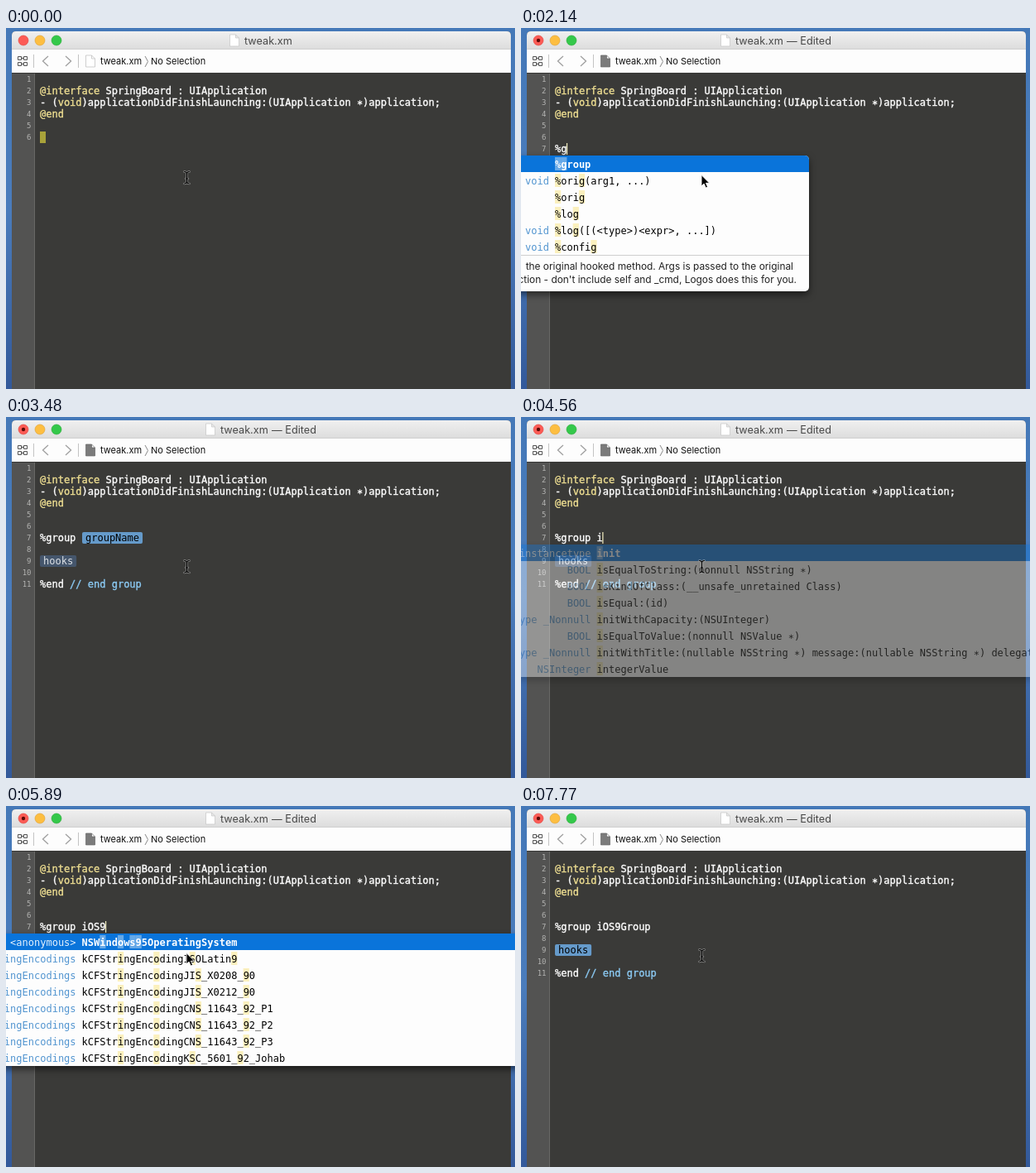
Write an HTML page that moves like this. It is 615x436 px and loops after 8000 ms.

```html
<!DOCTYPE html>
<html>
<head>
<meta charset="utf-8">
<style>
html, body { margin: 0; width: 100%; height: 100%; overflow: hidden; background: #3f6ca9; }
svg { display: block; }
text { white-space: pre; }
.code { font: 12px "DejaVu Sans Mono", monospace; stroke-width: .35px; }
.row { font: 12px "DejaVu Sans Mono", monospace; }
.bold { font-weight: bold; }
.num { font: 9px "DejaVu Sans Mono", monospace; fill: #b4b4b2; text-anchor: end; }
.ui { font-family: Inter, "Open Sans", sans-serif; }
.popup { filter: drop-shadow(0 4px 4px #0008); }
</style>
</head>
<body>
<svg id="stage" width="615" height="436" viewBox="0 0 615 436">
  <defs>
    <linearGradient id="desk" x2="0" y2="1">
      <stop stop-color="#4478b8"/><stop offset=".5" stop-color="#4a7cbc"/><stop offset="1" stop-color="#33599a"/>
    </linearGradient>
    <linearGradient id="bar" x2="0" y2="1"><stop stop-color="#f0f0f0"/><stop offset="1" stop-color="#dcdcdc"/></linearGradient>
  </defs>
  <rect width="615" height="436" fill="url(#desk)"/>
  <path d="M7 436V9q0-5 5-5H605q5 0 5 5V436z" fill="#3a3a38"/>
  <path d="M7 26V9q0-5 5-5H605q5 0 5 5V26z" fill="url(#bar)"/>
  <path d="M7 26H610V54H7z" fill="#fdfdfd"/>
  <path d="M7 25.5H610" stroke="#cfcfcf"/>
  <path d="M7 55H34V436H7z" fill="#535352"/>
  <path d="M34.5 55V436" stroke="#686866"/>
  <g stroke-width=".6">
    <circle cx="21" cy="15" r="6" fill="#fc5b55" stroke="#e0443e"/>
    <circle cx="41" cy="15" r="6" fill="#fdbe41" stroke="#dea033"/>
    <circle cx="61" cy="15" r="6" fill="#34c84a" stroke="#27a935"/>
  </g>
  <g fill="none" stroke="#555">
    <path d="M14.5 34.5h4v4h-4zM21.5 34.5h4v4h-4zM14.5 41.5h4v4h-4zM21.5 41.5h4v4h-4zM18.5 36.5h3M18.5 43.5h3"/>
    <path d="M33.5 32V48M87.5 32V48" stroke="#c4c4c4"/>
    <path d="M51 34l-6.5 6 6.5 6M72 34l6.5 6-6.5 6" stroke="#a0a0a0" stroke-width="1.3"/>
    <path d="M168 34l3.5 6.500-3.500 6.500" stroke="#888"/>
  </g>
  <g class="ui" font-size="11" fill="#111"><text x="114" y="44">tweak.xm</text><text x="175" y="44">No Selection</text></g>
  <g id="scene"></g>
</svg>
<script>
const CH = 7.224, LEFT = 41, TOP = 154, ROW = 20;
const YELLOW = '#efdf92', BLUE = '#8ccbf5';

const esc = s => s.replace(/&/g, '&amp;').replace(/</g, '&lt;').replace(/\*/g, '∗');
const text = (x, y, s, fill, cls, extra = '') =>
  `<text x="${x}" y="${y}" class="${cls}" fill="${fill}" ${extra}>${esc(s)}</text>`;
const rect = (x, y, w, h, fill, r = 0) =>
  `<rect x="${x}" y="${y}" width="${w}" height="${h}" rx="${r}" fill="${fill}"/>`;
const baseline = line => 52 + 14 * line;
const code = (col, line, s, fill = '#fff') =>
  text(LEFT + col * CH, baseline(line), s, fill, 'code', `stroke="${fill}"`);
const page = (x, y, fill, edge) =>
  `<path d="M${x} ${y}h7l4 4v10h-11zM${x + 7} ${y}v4h4" fill="${fill}" stroke="${edge}" stroke-width=".7"/>`;

function chip(x, line, s, active, ink = active ? '#000' : '#dde1e6') {
  return rect(x, baseline(line) - 11, s.length * CH + 8, 14, active ? '#659aca' : '#45566c', 2) +
    text(x + 4, baseline(line), s, ink, 'code');
}

// Positions of the typed letters inside a completion.
function matches(s, query) {
  s = s.toLowerCase();
  query = query.toLowerCase();
  const whole = s.indexOf(query);
  let at = -1;
  return [...query].map((c, i) => whole >= 0 ? whole + i : (at = s.indexOf(c, at + 1)));
}

function popup({ rows, query = '', col = 7, width = 640, doc, alpha = 1 }) {
  const x = LEFT + col * CH, listH = rows.length * ROW;
  const height = listH + (doc ? 44 : 0);
  let out = rect(-20, TOP, width + 20, height, '#fdfdfd', 5);
  out += `<clipPath id="clip">${rect(-20, TOP, width + 20, height, '#000', 5)}</clipPath><g clip-path="url(#clip)">`;
  out += rect(-20, TOP, width + 20, ROW, '#0a74da');
  rows.forEach((row, i) => {
    const [type, label] = row.split('|'), y = TOP + ROW * i;
    for (const m of matches(label, query))
      out += rect(x + m * CH, y + 2, CH, 16, i ? '#fbf0bd' : '#ffffff60');
    out += text(x - 7, y + 15, type, i ? '#5295d0' : '#e4f0fc', 'row', 'text-anchor="end"');
    out += text(x, y + 15, label, i ? '#000' : '#fff', i ? 'row' : 'row bold');
  });
  if (doc) {
    out += rect(-20, TOP + listH, width + 20, 1, '#cfcfcf');
    doc.forEach((s, i) => out += text(333 - (i ? 0 : 4), TOP + listH + 18 + 16 * i, s, '#222', 'ui',
      'font-size="11.9" text-anchor="end"'));
  }
  return `<g class="popup" opacity="${alpha}">${out}</g></g>`;
}

const beam = `<g fill="none" stroke-linecap="round"><path id="ib" d="M215.500 173.500q2.500 0 3 2q.5-2 3-2M218.500 175V186M215.500 188q2.500 0 3-2q.5 2 3 2M217 182h3" stroke="#ddd" stroke-opacity=".55" stroke-width="2.400"/>
  <path d="M215.500 173.500q2.500 0 3 2q.5-2 3-2M218.500 175V186M215.500 188q2.500 0 3-2q.5 2 3 2M217 182h3" stroke="#000" stroke-width="1.200"/></g>`;
const arrow = '<path d="M218 177.500v13.500l3.100-2.900 2.200 5 2.300-1-2.200-4.800h4.300z" fill="#000" stroke="#fff" stroke-width=".9"/>';

const origDoc = ['the original hooked method. Args is passed to the original',
  "ction - don't include self and _cmd, Logos does this for you."];
const groupDoc = ['a group of hooks that is set up with a call to %init', 'tion - groups can not be nested, Logos checks this for you.'];
const orig = ['void|%orig(arg1, ...)', '|%orig', '|%log', 'void|%log([(<type>)<expr>, ...])'];
const enc = 'CFStringEncodings|kCFStringEncoding';

const percentList = { col: 0, width: 348, doc: origDoc, query: '%', rows: [...orig, 'void|%config', '|%class', '|%ctor', '|%c'] };
const gList = { col: 0, width: 348, doc: origDoc, query: '%g', rows: ['|%group', ...orig, 'void|%config'] };
const groupList = { col: 0, width: 348, doc: groupDoc, query: '%gr', rows: ['|%group'] };
const iList = { query: 'i', rows: [
  'instancetype|init',
  'BOOL|isEqualToString:(nonnull NSString *)',
  'BOOL|isKindOfClass:(__unsafe_unretained Class)',
  'BOOL|isEqual:(id)',
  'instancetype _Nonnull|initWithCapacity:(NSUInteger)',
  'BOOL|isEqualToValue:(nonnull NSValue *)',
  'instancetype _Nonnull|initWithTitle:(nullable NSString *) message:(nullable NSString *) delegate:(nullable id)',
  'NSInteger|integerValue'] };
const setRows = [
  'void|intersectOrderedSet:(nonnull NSOrderedSet *)',
  'BOOL|intersectsOrderedSet:(nonnull NSOrderedSet *)',
  'BOOL|isOperatingSystemAtLeastVersion:(NSOperatingSystemVersion)',
  'NSUInteger|indexOfObject:(nonnull id) inSortedRange:(NSRange) options:(NSBinarySearchingOptions)',
  'BOOL|isKindOfClass:(__unsafe_unretained Class)',
  'BOOL|isSubsetOfSet:(nonnull NSSet *)'];
const iOList = { query: 'iO', rows: ['NSUInteger|indexOfObject:(nonnull id)', 'BOOL|isMemberOfClass:(__unsafe_unretained Class)', ...setRows] };
const iOSList = { query: 'iOS', rows: [
  'NSString *const _Nonnull|kCIAttributeFilterAvailable_iOS',
  'CFStringRef _Nonnull const|kCVPixelBufferIOSurfacePropertiesKey', ...setRows] };
const nineList = { query: 'iOS9', rows: ['<anonymous>|NSWindows95OperatingSystem',
  ...['ISOLatin9', 'JIS_X0208_90', 'JIS_X0212_90', 'CNS_11643_92_P1', 'CNS_11643_92_P2', 'CNS_11643_92_P3', 'KSC_5601_92_Johab'].map(s => enc + s)] };
const lastList = { width: 303, rows: ['<anonymous>|NSWindows95OperatingSystem'] };

// at: start time, typed: line 7, name: group name in the snippet ('' = placeholder)
const scenes = [
  { at: 0, fresh: 1 },
  { at: 1340, typed: '', fading: 1 },
  { at: 1610, typed: '' },
  { at: 1880, typed: '%', list: percentList, arrow: 1 },
  { at: 2140, typed: '%g', list: gList, arrow: 1 },
  { at: 2410, typed: '%gr', list: groupList, arrow: 1 },
  { at: 2680, typed: '%group', list: { ...groupList, query: '%group' }, arrow: 1 },
  { at: 3220, name: '', arrow: 1 },
  { at: 3480, name: '' },
  { at: 4560, name: 'i', list: { ...iList, alpha: .38 } },
  { at: 4830, name: 'i', list: iList, arrow: 1 },
  { at: 5100, name: 'iO', list: iOList, arrow: 1 },
  { at: 5360, name: 'iOS', list: iOSList, arrow: 1 },
  { at: 5630, name: 'iOS9', list: { ...nineList, query: 'iOS' }, arrow: 1 },
  { at: 5890, name: 'iOS9', list: nineList, arrow: 1 },
  { at: 6430, name: 'iOS9G', list: lastList },
  { at: 6700, name: 'iOS9Gr', list: { ...lastList, alpha: .5 } },
  { at: 6970, name: 'iOS9Grou' },
  { at: 7240, name: 'iOS9Group' },
  { at: 7500, name: 'iOS9Group', hooks: '#dde1e6' },
  { at: 7770, name: 'iOS9Group', hooks: '#000' }
];

function draw(s) {
  const plain = s.fresh || s.fading, snippet = s.name !== undefined;
  const titleX = s.fresh ? 288 : 259;
  let out = page(titleX - 17.5, 8, '#fff', '#c4c4c4');
  out += text(titleX, 20, 'tweak.xm', '#484848', 'ui', 'font-size="12.7"');
  if (!s.fresh) out += text(375, 20, '— Edited', '#484848', 'ui', `font-size="12.7" text-anchor="end" opacity="${s.fading ? .5 : 1}"`);
  out += plain ? page(96.500, 33, '#fff', '#bbb') : page(96.500, 33, '#7b7b7b', '#666');
  if (!plain) out += '<circle cx="21" cy="15" r="2.2" fill="#5a0b08"/>';

  const count = s.fresh ? 6 : snippet ? 11 : 7;
  for (let n = 1; n <= count; n++) out += text(30.5, baseline(n) - 1, '' + n, '', 'num');

  out += code(0, 2, '@interface', YELLOW) + code(11, 2, 'SpringBoard : UIApplication');
  out += code(0, 3, '- (') + code(3, 3, 'void', YELLOW);
  out += code(7, 3, ')applicationDidFinishLaunching:(UIApplication *)application;');
  out += code(0, 4, '@end', YELLOW);

  if (s.fresh) out += rect(LEFT, 125, 7, 14, '#a8a23a');
  const line = snippet ? '%group ' + s.name : s.typed || '';
  out += code(0, 7, line);
  if (snippet) {
    if (!s.name) out += chip(92, 7, 'groupName', true);
    out += chip(LEFT, 9, 'hooks', !!s.hooks, s.hooks);
    out += code(0, 11, '%end') + code(5, 11, '// end group', BLUE);
  }
  if (!s.fresh && s.name !== '' && !s.hooks)
    out += rect(LEFT + line.length * CH - .5, 139, 1.2, 14, '#f4efc0');
  if (s.list) out += popup(s.list);
  return out + (s.arrow ? arrow : beam);
}

const layer = document.getElementById('scene');
let shown;
function tick(now) {
  const t = now % 8000;
  const scene = scenes.filter(s => s.at <= t).pop();
  if (scene !== shown) layer.innerHTML = draw(shown = scene);
  requestAnimationFrame(tick);
}
tick(0);
</script>
</body>
</html>
```
